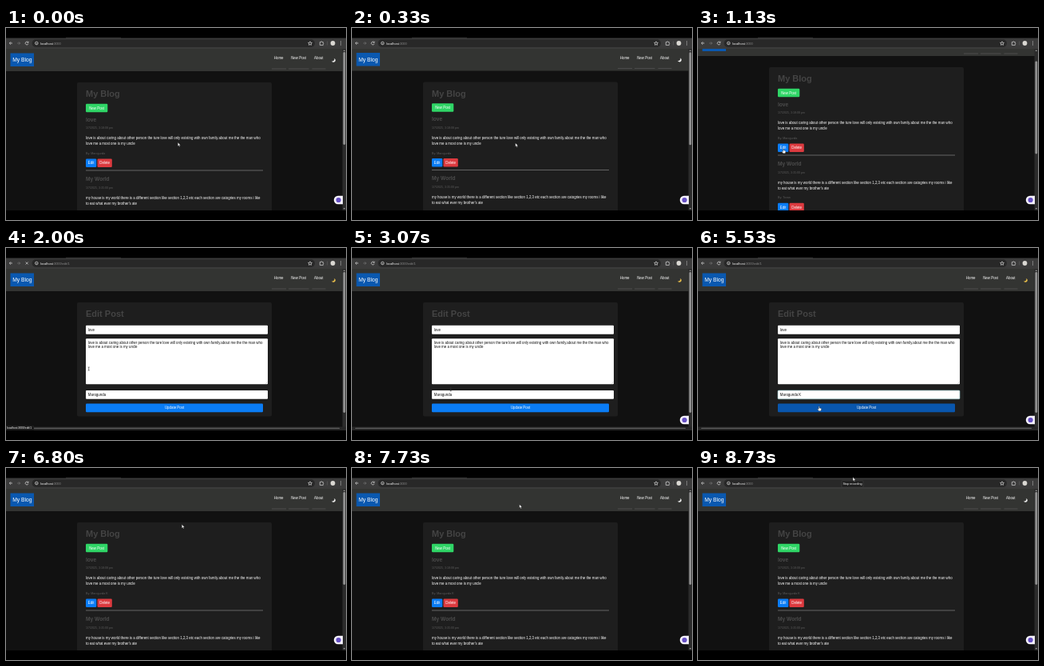
Recreate the animation shown at these times as an HTML page. Size 426 by 240 pixels, loop 8.79 s.

```html
<!DOCTYPE html>
<html lang="en">
<head>
<meta charset="utf-8">
<title>Blog demo</title>
<style>
  html, body { margin: 0; height: 100%; overflow: hidden; background: #000; }
  svg { display: block; width: 100vw; height: 100vh; font: 4.41px "Liberation Sans", Arial, sans-serif; fill: #fff; }
  text { white-space: pre; }
  .h1 { font-size: 11px; font-weight: bold; fill: #444; }
  .h2 { font-size: 6.62px; font-weight: bold; fill: #4c4c4c; }
  .small { font-size: 3.6px; fill: #5c5c5c; }
  .mid { text-anchor: middle; }
  .dark { fill: #111; }
  .line { fill: none; stroke: #ddd; stroke-width: .7; }
</style>
</head>
<body>
<svg viewBox="0 0 426 240">
  <defs>
    <clipPath id="view"><rect y="26" width="426" height="202"/></clipPath>
  </defs>

  <g clip-path="url(#view)">
    <rect y="26" width="426" height="202" fill="#111"/>
    <g id="page">
      <rect y="26" width="422" height="28" fill="#333432"/>
      <rect x="5.5" y="31.5" width="29.5" height="16.5" fill="#0a58b0"/>
      <text x="8.2" y="42.2" font-size="6.75">My Blog</text>
      <text x="335.8" y="39.3">Home</text>
      <text x="357.2" y="39.3">New Post</text>
      <text x="386" y="39.3">About</text>
      <path d="M333 51h18M354 51h25.500M383.500 51h17" stroke="#555" stroke-width=".8"/>
      <path id="moon" d="M411.200 38a2.500 2.500 0 1 1-3.200 3.200a2.400 2.400 0 0 0 3.200-3.200"/>

      <g id="home">
        <rect x="89" y="68" width="244" height="260" rx="2" fill="#1e1e1e"/>
        <text class="h1" x="100" y="86.300">My Blog</text>
        <rect x="100" y="94.800" width="27.300" height="10.500" rx="1.200" fill="#2fd566"/>
        <text class="mid" x="113.600" y="101.700">New Post</text>
        <g id="posts"></g>
        <path d="M100 178h222" stroke="#777" stroke-width=".8"/>
      </g>

      <g id="edit">
        <rect x="89" y="68" width="244" height="142.500" rx="2" fill="#1e1e1e"/>
        <text class="h1" x="100" y="86.300">Edit Post</text>
        <rect x="100" y="96.800" width="228" height="11" rx="1"/>
        <text class="dark" x="102.800" y="103.700">love</text>
        <rect x="100" y="113.300" width="228" height="57" rx="1"/>
        <text id="body1" class="dark" x="102.800" y="120.200"></text>
        <text id="body2" class="dark" x="102.800" y="125.300"></text>
        <path d="M325.500 169.500l2-2" stroke="#888" stroke-width=".4"/>
        <rect id="nameBox" x="100" y="178" width="228" height="10.800" rx="1" stroke-width=".6"/>
        <text id="name" class="dark" x="102.800" y="184.800"></text>
        <path id="underline" d="M102.800 185.800h22.300" stroke="#222" stroke-width=".5"/>
        <rect id="update" x="100" y="194.600" width="222" height="10.600" rx="1.200"/>
        <text class="mid" x="211" y="201.400">Update Post</text>
      </g>
    </g>

    <rect x="421.500" y="26" width="4.500" height="202" fill="#2b2b2b"/>
    <path d="M422.500 29l1.300-1.800 1.300 1.800z" fill="#999"/>
    <path d="M422.500 225l1.300 1.800 1.300-1.800z" fill="#999"/>
    <rect id="thumb" x="422.400" width="2.800" rx="1.400" fill="#929292"/>
    <g id="hbar">
      <rect y="223.500" width="426" height="4.500" fill="#262626"/>
      <rect x="4" y="224.700" width="414" height="1.300" rx=".6" fill="#5e5e5e"/>
    </g>
    <g id="badge">
      <path d="M422 209.800h-6a5.200 5.200 0 0 0 0 10.400h6z" fill="#f3f0fa"/>
      <circle cx="416.600" cy="215" r="3.100" fill="#6650c4"/>
    </g>
    <g id="status">
      <rect y="222" width="35" height="6" fill="#1d1d1d"/>
      <text x="1" y="226.200" font-size="3.400">localhost:3000/edit/1</text>
    </g>
  </g>

  <rect x="75" y="11.800" width="69" height=".8" fill="#444"/>
  <rect y="12.500" width="426" height="13.500" fill="#3b3b3b"/>
  <rect x="32.500" y="14.300" width="354.500" height="9.600" rx="4.800" fill="#282828"/>
  <path class="line" d="M8 19h-3.600m1.600-1.700l-1.700 1.700 1.700 1.700"/>
  <path class="line" d="M14 19h3.600m-1.600-1.700l1.700 1.700-1.700 1.700" style="stroke:#777"/>
  <path id="reload" class="line" d="M27.700 18a1.900 1.900 0 1 0 .2 1.700M28 16.700v1.600h-1.600"/>
  <path id="stop" class="line" d="M24.700 17.500l3 3m0-3l-3 3"/>
  <circle class="line" cx="38.300" cy="19" r="1.800"/>
  <path class="line" d="M38.300 18.800v1.200"/>
  <text x="43" y="20.500" font-size="4">localhost<tspan id="url" fill="#8d8d8d"></tspan></text>
  <path class="line" d="M381 16.800l.7 1.500 1.700.2-1.200 1.100.3 1.700-1.500-.8-1.500.8.3-1.700-1.200-1.100 1.700-.2z" stroke-width=".5"/>
  <path class="line" d="M393.300 17.600h1.200a.8.8 0 0 1 1.600 0h1.200v1.300a.8.800 0 0 1 0 1.500v1h-4z"/>
  <path d="M402.500 16.500v5" stroke="#666" stroke-width=".5"/>
  <circle cx="409.500" cy="19" r="2.900" fill="#d9d7d2"/>
  <path d="M419.500 17v0m0 2v0m0 2v0" stroke="#ddd" stroke-width="1" stroke-linecap="round"/>

  <g id="suggest">
    <rect x="126.500" y="171" width="33.500" height="9.300" rx="1" fill="#202020"/>
    <g font-family="'Liberation Serif', serif" font-size="4.400">
      <text x="131.300" y="177.300">is</text><text x="141.800" y="177.300">and</text><text x="155.800" y="177.300">I</text>
    </g>
  </g>
  <g id="tooltip">
    <rect x="180" y="15.800" width="27" height="8.400" rx="1" fill="#202020" stroke="#555" stroke-width=".4"/>
    <text class="mid" x="193.500" y="21.300" font-size="3.700">Stop recording</text>
  </g>

  <g id="cursor" stroke="#111" stroke-width=".35">
    <path id="arrow" d="M0 0v4.700l1.100-1 .8 1.800.8-.4-.8-1.700h1.500z"/>
    <path id="hand" d="M-.5 0q.5-.6 1 0v2l2 .5q.6.200.4 1l-.6 2.200h-2.600l-1.800-2.300q.2-.7 1.600.2z"/>
    <path id="beam" d="M-1 -2h2m-1 0v4m-1 0h2" stroke="#333" stroke-width=".6" fill="none"/>
  </g>
</svg>

<script>
const $ = id => document.getElementById(id);
const show = (id, on) => $(id).style.display = on ? '' : 'none';
const LOOP = 8790, STEP = 1000 / 15;
const AUTHOR = 'Marogunda';
const LOVE = [
  'love is about caring about other person the ture love will only existing with own family.about me the the man who',
  'love me a most one is my uncle'
];
const WORLD = [
  'my house is my world there is a different section like section 1,2,3 etc each section are catogries my rooms i like',
  "to eat what ever my brother's ate"
];

const post = (dy, title, date, lines, author, id) => `<g transform="translate(100 ${dy})">
  <text class="h2" y="116.600">${title}</text>
  <text class="small" y="126.300">${date}</text>
  <text y="139.300">${lines[0]}</text><text y="146.300">${lines[1]}</text>
  <text class="small" y="158" id="${id}">By: ${author}</text>
  <rect y="163.500" width="13.300" height="10.500" rx="1.200" fill="#0a7cf5"/>
  <rect x="14.500" y="163.500" width="18.300" height="10.500" rx="1.200" fill="#dc3a3f"/>
  <text class="mid" x="6.650" y="170.300">Edit</text><text class="mid" x="23.650" y="170.300">Delete</text></g>`;

$('posts').innerHTML =
  post(0, 'love', '1/7/2025, 3:18:08 pm', LOVE, AUTHOR, 'by') +
  post(74.3, 'My World', '1/7/2025, 3:35:00 pm', WORLD, 'Tovan', 'by2');
$('body1').textContent = LOVE[0];
$('body2').textContent = LOVE[1];

// Pointer stops: time, x, y
const PATH = [
  [0, 215.3, 143], [200, 215, 143], [900, 107, 151], [1750, 107, 151], [2000, 103.7, 151],
  [2470, 103.7, 151], [3300, 128.5, 183], [4900, 128.5, 183], [5470, 151.7, 198],
  [6130, 151.7, 198], [6800, 220.3, 70.5], [7670, 210, 46], [8470, 194, 11.5], [LOOP, 194, 11.5]
];
const ease = u => u * u * (3 - 2 * u);
const ramp = (t, a, b) => ease(Math.min(1, Math.max(0, (t - a) / (b - a))));

function pointer(t) {
  const i = PATH.findIndex(p => p[0] > t);
  const [a, x, y] = PATH[i - 1], [b, x2, y2] = PATH[i];
  const u = ramp(t, a, b);
  return [x + (x2 - x) * u, y + (y2 - y) * u];
}

function draw(t) {
  const between = (a, b) => t >= a && t < b;
  const editing = between(1925, 6130), saved = t >= 6130;
  const scroll = editing || saved ? 0 : 19 * ramp(t, 300, 650);
  const [x, y] = pointer(t);

  $('page').setAttribute('transform', `translate(0 ${-scroll})`);
  show('home', !editing);
  show('edit', editing);
  show('hbar', editing);
  $('moon').setAttribute('fill', editing ? '#e8bf4a' : '#eee');
  $('thumb').setAttribute('y', 30 + scroll * .6);
  $('thumb').setAttribute('height', editing ? 176 : 116);
  $('url').textContent = ':3000' + (editing ? '/edit/1' : '');

  const loading = between(1730, 2260) || between(5860, 6330);
  show('stop', loading);
  show('reload', !loading);
  show('status', between(1260, 2260));
  show('badge', !between(1925, 2320) && !between(6130, 6460));

  const typed = t < 4325 ? '' : t < 4525 ? ' ' : ' K';
  $('name').textContent = AUTHOR + typed;
  $('by').textContent = 'By: ' + AUTHOR + (saved ? ' K' : '');
  $('nameBox').setAttribute('stroke', t > 3330 ? '#8fc4c8' : 'none');
  show('underline', between(3720, 4325));
  show('suggest', between(3720, 4525));

  const overUpdate = editing && y > 194;
  $('update').setAttribute('fill', overUpdate ? '#0956ad' : '#0a7cf5');
  show('tooltip', t >= 8520);

  const hand = between(860, 1925) || overUpdate;
  const beam = between(1925, 3720);
  show('hand', hand);
  show('beam', beam);
  show('arrow', !hand && !beam);
  $('cursor').setAttribute('transform', `translate(${x} ${y})`);
}

function tick() {
  const t = performance.now() % LOOP;
  draw(Math.floor((t + 4) / STEP) * STEP);
  requestAnimationFrame(tick);
}
tick();
</script>
</body>
</html>
```
